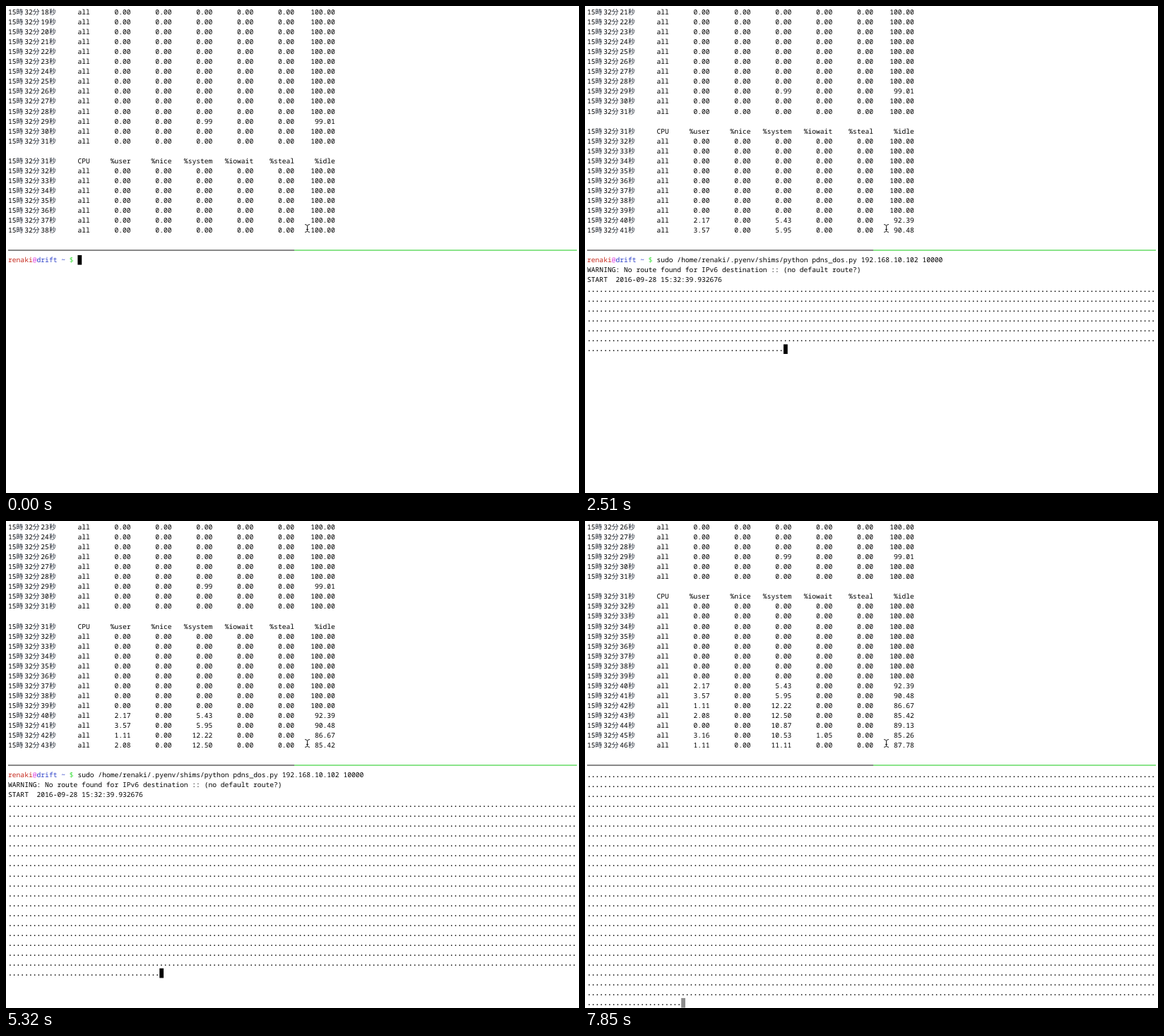
An HTML page with a canvas that plays this animation: 811x690 px, repeating every 8000 ms.

```html
<!DOCTYPE html>
<html lang="ja">
<head>
<meta charset="utf-8">
<title>Terminal</title>
<style>
  html, body { margin: 0; width: 100%; height: 100%; overflow: hidden; background: #fff; }
  canvas { display: block; }
</style>
</head>
<body>
<canvas id="screen" width="811" height="690"></canvas>
<script>
const ctx = document.getElementById('screen').getContext('2d');
const LOOP = 8000, REFRESH = 148, LEAD = 12;
const COLS = 139, CELL = 5.791, LINE = 14.04, LEFT = 3, TOP = 2, BASELINE = 10.1;
const STAT_ROWS = 23, PANE_ROW = 25, PANE_ROWS = 24;
const TYPED = 480, WARNED = 640, STARTED = 800, BLURRED = 7840;

const mono = weight => `${weight} ${CELL / 0.6}px "Noto Sans Mono", monospace`;
const TEXT = mono(500), DOTS = mono(800);
const KANJI = '400 9.8px "Noto Sans CJK JP", "Noto Sans CJK", sans-serif';

// Key points of the output: time and dots printed so far
const PROGRESS = [[0, 0], [TYPED, 0], [STARTED, 14], [960, 95], [1170, 192],
  [2510, 882], [5320, 2400], [7850, 3776], [LOOP, 3776]];

const PROMPT = [['renaki', '#c5281c'], ['@', '#e04be0'], ['drift ~ ', '#2b3fc8'], ['$ ', '#3fe03f']];
const PROMPT_LENGTH = PROMPT.map(([text]) => text).join('').length;
const COMMAND = 'sudo /home/renaki/.pyenv/shims/python pdns_dos.py 192.168.10.102 10000';

// CPU ticks of the busy seconds; percentages and idle time follow from them
const BUSY = {
  29: { system: 1, total: 101 },
  40: { user: 2, system: 5, total: 92 },
  41: { user: 3, system: 5, total: 84 },
  42: { user: 1, system: 11, total: 90 },
  43: { user: 2, system: 12, total: 96 },
  44: { system: 10, total: 92 },
  45: { user: 3, system: 10, iowait: 1, total: 95 },
  46: { user: 1, system: 10, total: 90 }
};

const cellX = col => LEFT + col * CELL;
const rowY = row => TOP + row * LINE;

function put(text, col, row, color = '#000', font = TEXT) {
  ctx.font = font;
  ctx.fillStyle = color;
  ctx.fillText(text, cellX(col), rowY(row) + BASELINE);
}

function statLine(second, label, values) {
  const cells = values.map((value, i) => value.padStart(i ? 10 : 10));
  return { second, text: label + cells.join('') };
}

function percentages(second) {
  const { user = 0, system = 0, iowait = 0, total = 100 } = BUSY[second] || {};
  const idle = total - user - system - iowait;
  return [user, 0, system, iowait, 0, idle].map(ticks => (100 * ticks / total).toFixed(2));
}

const stats = [];
for (let second = 10; second <= 46; second++) {
  stats.push(statLine(second, 'all', percentages(second)));
  if (second === 31) {
    const titles = ['%user', '%nice', '%system', '%iowait', '%steal', '%idle'];
    stats.push(null, statLine(second, 'CPU', titles));
  }
}

function drawStats(lastSecond) {
  const end = stats.findIndex(line => line && line.second === lastSecond) + 1;
  stats.slice(end - STAT_ROWS, end).forEach((line, row) => {
    if (!line) return;
    put(`15  32  ${line.second}`, 0, row);
    [...'時分秒'].forEach((sign, i) => put(sign, 2 + i * 4, row, '#1c2430', KANJI));
    put(line.text, 17, row);
  });
}

function drawDivider() {
  ctx.fillStyle = '#4a4a4a';
  ctx.fillRect(LEFT, 345.4, 405, 1.3);
  ctx.fillStyle = '#4fd64f';
  ctx.fillRect(408, 345.4, 400, 1.3);
}

function drawPrompt(row, typed) {
  let col = 0;
  for (const [text, color] of PROMPT) {
    put(text, col, row, color);
    col += text.length;
  }
  if (typed) put(COMMAND, col, row);
}

function drawShell(time, dots) {
  const typed = time >= TYPED;
  const lines = [row => drawPrompt(row, typed)];
  const addText = (text, font) => lines.push(row => put(text, 0, row, '#000', font));
  let cursorCol = PROMPT_LENGTH + (typed ? COMMAND.length : 0);

  if (time >= WARNED) {
    addText('WARNING: No route found for IPv6 destination :: (no default route?)');
    if (time >= STARTED) addText('START  2016-09-28 15:32:39.932676');
    for (let left = dots; left >= COLS; left -= COLS) addText('.'.repeat(COLS), DOTS);
    cursorCol = dots % COLS;
    addText('.'.repeat(cursorCol), DOTS);
  }

  const visible = lines.slice(-PANE_ROWS);
  visible.forEach((drawLine, i) => drawLine(PANE_ROW + i));
  ctx.fillStyle = time >= BLURRED ? '#8c8c8c' : '#000';
  ctx.fillRect(cellX(cursorCol), rowY(PANE_ROW + visible.length - 1), CELL, LINE - 0.4);
}

function drawPointer() {
  ctx.strokeStyle = '#222';
  ctx.lineWidth = 1;
  ctx.stroke(new Path2D('M423 309.5 Q426.5 309.5 426.5 312 V318 Q426.5 320.5 423 320.5' +
    'M430 309.5 Q426.5 309.5 426.5 312 M426.5 318 Q426.5 320.5 430 320.5 M425 316.5 H428'));
}

// Time and dot count at the latest screen refresh
function lastRefresh(now) {
  const next = PROGRESS.findIndex(([start]) => start > now);
  const [start, from] = PROGRESS[next - 1], [end, to] = PROGRESS[next];
  const steps = Math.max(1, Math.round((end - start) / REFRESH));
  const part = Math.floor((now - start) / (end - start) * steps) / steps;
  return { time: start + (end - start) * part, dots: Math.round(from + (to - from) * part) };
}

function draw() {
  const now = Math.min(performance.now() % LOOP + LEAD, LOOP - 1);
  const { time, dots } = lastRefresh(now);
  ctx.fillStyle = '#fff';
  ctx.fillRect(0, 0, 811, 690);
  ctx.textRendering = 'geometricPrecision';
  drawStats(39 + Math.floor((time - 340) / 1000));
  drawDivider();
  drawShell(time, time >= STARTED ? dots : 0);
  drawPointer();
  requestAnimationFrame(draw);
}
draw();
</script>
</body>
</html>
```
